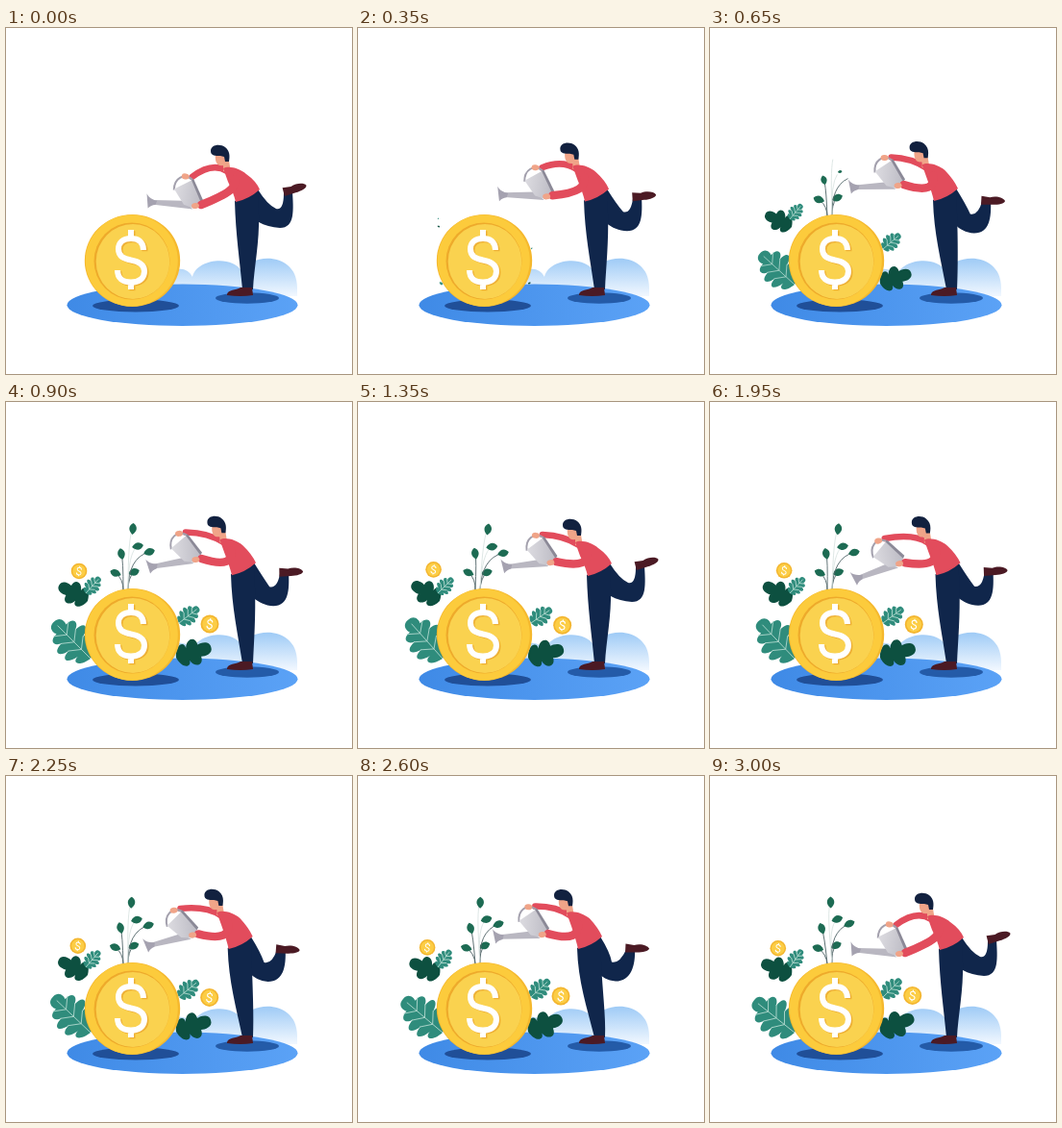
Write an HTML page that moves like this. It is 360 px wide and 360 px high and loops after 3050 ms.

```html
<!DOCTYPE html>
<html lang="en">
<head>
<meta charset="utf-8">
<title>Watering a coin</title>
<style>
html, body { margin: 0; width: 100%; height: 100%; overflow: hidden; background: #fff; }
svg { display: block; width: 100vw; height: 100vh; }
.pants { fill: #10264b; }
.shirt { fill: #e24c5c; }
.sleeve { fill: none; stroke: #e24c5c; stroke-linecap: round; }
.skin { fill: #f0a488; }
.shoe { fill: #4b1a24; }
.hair { fill: #12213f; }
.stem { fill: none; stroke: #53676a; stroke-width: .9; stroke-dasharray: 1; }
.vein { fill: none; stroke: #b9ddd3; stroke-width: .8; }
.dollar { fill: none; stroke: #fff; stroke-width: 6; }
</style>
</head>
<body>
<svg viewBox="0 0 360 360">
  <defs>
    <linearGradient id="sky" gradientUnits="userSpaceOnUse" x1="0" y1="240" x2="0" y2="280">
      <stop offset="0" stop-color="#9fcbf6"/><stop offset="1" stop-color="#f4f9ff"/>
    </linearGradient>
    <linearGradient id="pond" x1="0" y1="0" x2="1" y2="0">
      <stop offset="0" stop-color="#3f8ae6"/><stop offset="1" stop-color="#5ba2f6"/>
    </linearGradient>
    <linearGradient id="metal" x1="0" y1="0" x2="1" y2="0">
      <stop offset="0" stop-color="#dddce1"/><stop offset="1" stop-color="#bcbbc4"/>
    </linearGradient>
    <path id="sign" d="M143 231C143 222 137 219 130 219C121 219 117 224 117 230C117 238 123 240 130 241.5C138 243 144 246 144 253C144 261 138 264.500 130 264.500C121 264.500 116 260 116 252M130 210V219M130 264V272"/>
  </defs>

  <path fill="url(#sky)" d="M165 274C165 250 186 244 194 259C198 240 236 236 245 253C256 233 303 233 303 270V279H165Z"/>
  <ellipse cx="183.500" cy="288.300" rx="120" ry="21.700" fill="url(#pond)"/>
  <ellipse cx="135" cy="289" rx="45" ry="6.500" fill="#204f98"/>
  <ellipse cx="251" cy="281" rx="33" ry="5.800" fill="#245ba8"/>

  <g id="plants"></g>

  <ellipse cx="131.500" cy="242" rx="49.700" ry="48" fill="#f5b82d"/>
  <ellipse cx="130.800" cy="242" rx="48" ry="47.500" fill="#fccb3c"/>
  <ellipse cx="131" cy="242.500" rx="39.500" ry="40" fill="#eeaa2b"/>
  <ellipse cx="132" cy="243" rx="38.300" ry="39" fill="#fad24f"/>
  <use href="#sign" class="dollar" style="stroke:#eeb036" x="1.500" y="1.200"/>
  <use href="#sign" class="dollar"/>

  <g id="coins"></g>

  <path id="farArm" class="sleeve" stroke-width="6.500"/>
  <g id="can">
    <path fill="none" stroke="#a3a0ad" stroke-width="2" d="M-25 -12C-27 -24 -18 -32 -8 -26"/>
    <path fill="#b9b7c1" d="M-2 4L-43 7L-44 2.500L-12 -3Z"/>
    <path fill="#a5a2b0" d="M-52 -3C-49 1 -45 2 -40 2.500L-41 7C-44 8 -46 9 -48 12Z"/>
    <path fill="url(#metal)" d="M-25 -13L-8 -26L6 -6L0 3L-12 1Z"/>
    <path fill="#8b8997" d="M-9 -25.500L-7 -27L7 -7L5 -4.500Z"/>
    <ellipse class="skin" cx="-16" cy="-28" rx="4" ry="3"/>
  </g>
  <path id="bent" class="pants"/>
  <path id="stand" class="pants"/>
  <path id="kick" class="shoe" d="M-1 -3L8 -3C14 -6 22 -5 24 -2C24 1 18 3 12 4L0 6Z"/>
  <path class="shoe" d="M230 277C231 272 239 273 244 270H256L257 278Q244 280 230 278Z"/>
  <g id="head">
    <path class="skin" d="M218 131L231 132L234 150L226 149L226 143C220 144 217 140 218 131Z"/>
    <path class="hair" d="M213 128C213 121 223 120 228 124C233 128 233 133 232 139L228 139L227 134L223 133C218 133 213 133 213 128Z"/>
  </g>
  <path id="torso" class="shirt"/>
  <path id="nearArm" class="sleeve" stroke-width="8.500"/>
  <ellipse id="nearHand" class="skin" rx="4" ry="3"/>
</svg>

<script>
const LOOP = 3050, STEP = 50;
const $ = id => document.getElementById(id);
const grow = (t, start, span) => 1 - (1 - Math.max(0, Math.min(1, (t - start) / span))) ** 1.6;
const place = (el, x, y, turn = 0, size = 1) =>
  el.setAttribute('transform', `translate(${x} ${y}) rotate(${turn}) scale(${size})`);
const shape = (id, d) => $(id).setAttribute('d', d);

function add(parent, tag, attrs) {
  const el = document.createElementNS('http://www.w3.org/2000/svg', tag);
  for (const key in attrs) el.setAttribute(key, attrs[key]);
  return parent.appendChild(el);
}

// Lobed leaf standing upright on the origin.
function lobed(len, width, lobes) {
  const half = u => width * Math.sin(Math.PI * (0.12 + 0.8 * u));
  const side = sign => {
    let d = 'M0 0';
    for (let i = 0; i < lobes; i++) {
      const bulge = sign * half((i + 0.75) / lobes) * 1.3;
      const x = i === lobes - 1 ? 0 : sign * half((i + 1) / lobes) * 0.55;
      d += `C${bulge} ${-len * (i + 0.25) / lobes} ${bulge} ${-len * (i + 1.03) / lobes} ${x} ${-len * (i + 1) / lobes}`;
    }
    return d;
  };
  return side(-1) + side(1);
}

function veins(len, width) {
  let d = `M0 0V${-len * 0.9}`;
  for (const u of [0.25, 0.45, 0.65]) {
    const x = width * 0.6, y = -len * (u + 0.16);
    d += `M${-x} ${y}L0 ${-len * u}L${x} ${y}`;
  }
  return d;
}

// Base x, y, turn, length; dark leaves are plain.
const bush = (x, y, turn, len, dark) => {
  const el = add($('plants'), 'g', {}), width = len * 0.34;
  add(el, 'path', { d: lobed(len, width, dark ? 3 : 5), fill: dark ? '#0d5040' : '#2f8c7c' });
  if (!dark) add(el, 'path', { d: veins(len, width), class: 'vein' });
  return { el, x, y, turn };
};
const bushes = [
  bush(88, 267, -45, 54), bush(85, 207, -61, 34, true), bush(83, 199, 42, 22),
  bush(180, 230, 52, 26), bush(177, 266, 73, 38, true)
];

// Twigs rise from two roots, each ending in a leaf.
const sprig = add($('plants'), 'g', {});
const twigs = [
  [114, 178, -70], [133, 177, 72], [120, 158, -12], [137, 150, 80], [149, 156, 75], [132, 132, 5]
].map(([x, y, turn], i) => {
  const root = x < 125 ? 122 : 127;
  const stem = add(sprig, 'path', { d: `M${root} 196Q${root} ${y + 6} ${x} ${y}`, class: 'stem', pathLength: 1 });
  if (i === 3 || i === 5) stem.style.stroke = '#dbe5e3';
  const leaf = add(sprig, 'path', { d: 'M0 6C-5 2 -5 -3 0 -6C5 -3 5 2 0 6', fill: '#1d6b53' });
  return { stem, leaf, x, y, turn, start: 430 + 60 * i };
});

const coin = (x, y, r, dx, dy) => {
  const el = add($('coins'), 'g', {});
  add(el, 'circle', { r, fill: '#f3b52f' });
  add(el, 'circle', { r: r * 0.82, fill: '#fccd45' });
  add(el, 'use', { href: '#sign', class: 'dollar', transform: `rotate(8) scale(${r / 50}) translate(-130 -241)` });
  return { el, x, y, dx, dy };
};
const coins = [coin(76, 176, 8.3, 8, -5), coin(212, 231, 9.5, 2, 4)];

// Time, body lean, can lift, can tilt
const keys = [
  [0, 0, 0, 11], [650, 0.6, 1, 4], [900, 0.4, 1, -3], [1350, 0, 0.85, 1],
  [1950, 0.35, 0.8, -13], [2600, 1, 0.95, 3], [3000, 0, 0, 11], [LOOP, 0, 0, 11]
];

// Smooth curve through the keys, resting at the loop's ends.
function poseAt(t) {
  const i = keys.findIndex((key, n) => t < keys[n + 1][0]);
  const a = keys[i], b = keys[i + 1], span = b[0] - a[0], u = (t - a[0]) / span;
  const slope = (n, j) => {
    if (n < 1 || n > keys.length - 3) return 0;
    const p = keys[n - 1], q = keys[n + 1];
    return (q[j] - p[j]) / (q[0] - p[0]) * span;
  };
  return [1, 2, 3].map(j => {
    const ease = u * u * (3 - 2 * u);
    return a[j] + (b[j] - a[j]) * ease + u * (1 - u) * ((1 - u) * slope(i, j) - u * slope(i + 1, j));
  });
}

function drawMan(t) {
  const [lean, lift, tilt] = poseAt(t);
  const bend = Math.sin(2 * lean);
  const shift = (dx, dy) => (x, y) => `${x + dx} ${y + dy} `;
  const head = [-9 * lean, -4 * bend];
  const foot = [289 - 10 * lean, 169 + 9.5 * bend];
  const H = shift(...head), W = shift(-10 * lean, -bend);
  const K = shift(-17 * lean, 6 * bend), F = shift(...foot);

  const nx = 197 + 4 * lift - 9 * lean, ny = 185 - 21 * lift;
  const a = tilt * Math.PI / 180, cos = Math.cos(a), sin = Math.sin(a);
  const onCan = (x, y) => `${nx + x * cos - y * sin} ${ny + x * sin + y * cos}`;

  place($('head'), ...head);
  place($('kick'), ...foot, 19 * bend - 8);
  place($('can'), nx, ny, tilt);
  place($('nearHand'), nx, ny, -10);

  shape('bent', `M${W(262, 168)}Q${W(272, 184)}${K(281, 188)}Q${K(289, 190)}${F(0, 3)}L${F(9, 1)}` +
    `C${F(10, 20)}${K(301, 208)}${K(285, 208)}C${K(268, 207)}${W(255, 200)}${W(246, 184)}Z`);
  shape('stand', `M${W(238, 180)}C${W(239, 215)}${243 - 5 * lean} 240 246 272L257 272` +
    `C258 250 ${W(264, 222)}${W(263, 194)}L${W(262, 168)}Z`);
  shape('torso', `M${H(226, 146)}C${H(232, 143)}${H(243, 146)}${H(250, 152)}Q${W(260, 159)}${W(264, 168)}` +
    `Q${W(253, 178)}${W(239, 181)}Q${W(237, 172)}${H(231, 160)}Z`);
  shape('farArm', `M${H(230, 149)}Q${H(215, 139)}${onCan(-9, -29)}`);
  shape('nearArm', `M${H(238, 157)}C${W(240, 166)}${W(233, 172)}${nx + 6} ${ny - 1}`);
}

function drawPlants(t) {
  const sway = (1 - Math.cos(2 * Math.PI * t / 3000)) / 2 - 0.65;
  for (const b of bushes) place(b.el, b.x, b.y, b.turn + sway * 10, grow(t, 330, 420));
  sprig.setAttribute('transform', `rotate(${sway * 9} 125 195)`);
  const drawn = grow(t, 350, 380);
  for (const { stem, leaf, x, y, turn, start } of twigs) {
    stem.setAttribute('stroke-dashoffset', 1 - drawn);
    stem.setAttribute('visibility', drawn > 0 ? 'visible' : 'hidden');
    place(leaf, x, y, turn, grow(t, start, 150));
  }
  for (const c of coins) place(c.el, c.x + c.dx * sway, c.y + c.dy * sway, 0, grow(t, 660, 210));
}

const begin = performance.now();
function tick(now) {
  const t = Math.floor((Math.max(0, now - begin) % LOOP) / STEP) * STEP;
  drawMan(t);
  drawPlants(t);
  requestAnimationFrame(tick);
}
tick(begin);
</script>
</body>
</html>
```
